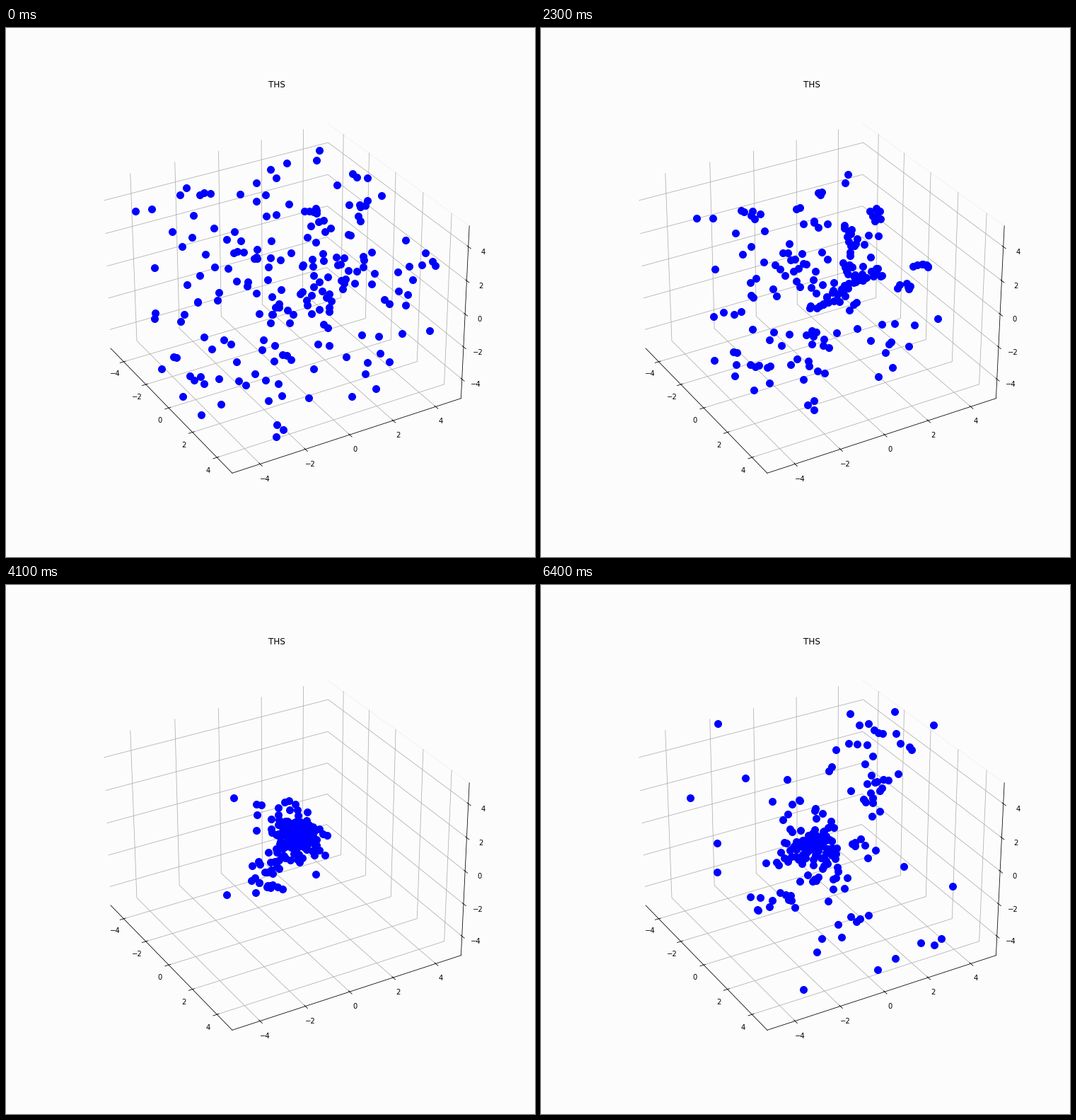
Animation, 748 px wide and 748 px high, one loop 6500 ms. Source, as a matplotlib script:

```python
import numpy as np
import matplotlib.pyplot as plt
from matplotlib.animation import FuncAnimation
from matplotlib.lines import Line2D

SIZE, DPI = 748, 72
FRAMES, INTERVAL = 65, 100
COUNT, HALF, REACH = 200, 5.0, 7.5
LIMIT = HALF * 25 / 24
DT, GM, SOFT = INTERVAL / 1000, 20.0, 0.2
PAPER = "#fcfcfc"


def start_points(rng):
    """Even spread in a cube with its far corners cut off."""
    pts = rng.uniform(-HALF, HALF, (2 * COUNT, 3))
    return pts[np.linalg.norm(pts, axis=1) < REACH][:COUNT]


def pull(pos):
    """Softened gravity between all bodies of equal mass."""
    gap = pos[None] - pos[:, None]
    d2 = (gap ** 2).sum(axis=2) + SOFT ** 2
    return GM / COUNT * (gap / d2[..., None] ** 1.5).sum(axis=1)


def simulate():
    pos = start_points(np.random.default_rng(4))
    vel = np.zeros_like(pos)
    path = [pos]
    for _ in range(FRAMES - 1):
        vel = vel + pull(pos) * DT
        pos = pos + vel * DT
        path.append(pos)
    return path


path = simulate()
fig = plt.figure(figsize=(SIZE / DPI, SIZE / DPI), dpi=DPI, facecolor=PAPER)
ax = fig.add_subplot(projection="3d", facecolor="none")
ax.view_init(elev=30, azim=-30)
span = (-LIMIT, LIMIT)
ax.set(xlim=span, ylim=span, zlim=span, title="THS")
for axis in (ax.xaxis, ax.yaxis, ax.zaxis):
    axis.set_pane_color((1, 1, 1, 0))
    axis.set_major_locator(plt.MultipleLocator(2))

# Faint upper edge of the right wall
fig.add_artist(Line2D([455 / SIZE, 655 / SIZE], [1 - 135 / SIZE, 1 - 280 / SIZE],
                      color="#f0f0f0", lw=0.8, zorder=-1))
dots, = ax.plot([], [], [], "o", color="blue", ms=10)


def draw(i):
    dots.set_data_3d(*path[i].T)
    return dots,


anim = FuncAnimation(fig, draw, frames=FRAMES, interval=INTERVAL, repeat=True)
plt.show()
```
